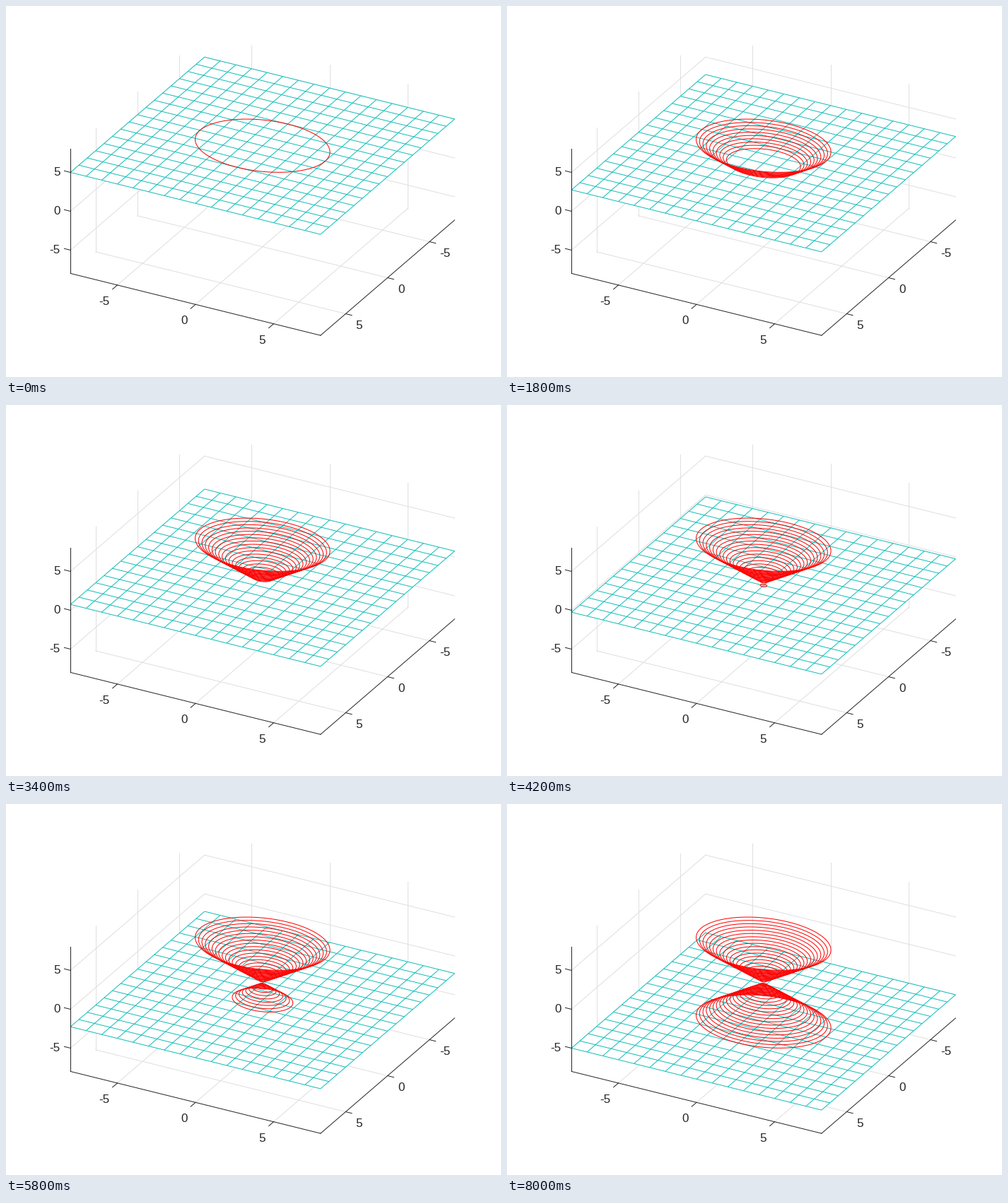
A matplotlib script for the animation above (8.2 s loop, 700 by 525 pixels).

```python
import numpy as np
import matplotlib.pyplot as plt
from matplotlib.animation import FuncAnimation
from matplotlib.collections import LineCollection
from matplotlib.patches import Polygon

W, H, DPI = 700, 525, 100
STEPS, INTERVAL = 41, 200
LIM = 8
TICKS = (-5, 0, 5)
PX = 72 / DPI

DARK, GRID, TEAL, RED = "#262626", "#dfdfdf", "#12beb9", "#ff0000"

ORIGIN = np.array([362.8, 252.7])
AX = np.array([22.1, 5.48])
AY = np.array([-11.85, 10.2])
AZ = np.array([0, -11.0])


def project(x, y, z):
    """Parallel projection of space to stage pixels."""
    x, y, z = np.broadcast_arrays(x, y, z)
    return ORIGIN + x[..., None] * AX + y[..., None] * AY + z[..., None] * AZ


def segment(p, q):
    return np.array([project(*p), project(*q)])


def ellipse(z):
    t = np.linspace(0, 2 * np.pi, 181)
    return project(0.8 * z * np.cos(t), 0.6 * z * np.sin(t), z)


def mesh(z):
    lines = []
    for v in range(-LIM, LIM + 1):
        lines.append(segment((v, -LIM, z), (v, LIM, z)))
        lines.append(segment((-LIM, v, z), (LIM, v, z)))
    return lines


fig = plt.figure(figsize=(W / DPI, H / DPI), dpi=DPI, facecolor="white")
ax = fig.add_axes([0, 0, 1, 1])
ax.set_xlim(0, W)
ax.set_ylim(H, 0)
ax.axis("off")


def stroke(points, color, order):
    ax.plot(*np.transpose(points), color=color, lw=PX, zorder=order)


def label(value, pos, ha):
    ax.text(*pos, str(value), ha=ha, va="baseline", color=DARK,
            family="Liberation Sans", fontsize=17 * PX, zorder=6)


def tick(base, direction):
    step = 9 * direction / np.hypot(*direction)
    stroke([base, base + step], DARK, 5)


# Walls, floor, ticks and labels
for v in TICKS:
    for p, q in (
        ((-LIM, v, -LIM), (-LIM, v, LIM)),
        ((v, -LIM, -LIM), (v, -LIM, LIM)),
        ((-LIM, -LIM, v), (-LIM, LIM, v)),
        ((-LIM, -LIM, v), (LIM, -LIM, v)),
        ((v, -LIM, -LIM), (v, LIM, -LIM)),
        ((-LIM, v, -LIM), (LIM, v, -LIM)),
    ):
        stroke(segment(p, q), GRID, 1)

    px = project(v, LIM, -LIM)
    py = project(LIM, v, -LIM)
    pz = project(-LIM, LIM, v)
    tick(px, AY)
    tick(py, AX)
    tick(pz, -AX)
    label(v, px + (-11.3, 28.2), "right")
    label(v, py + (14.4, 21.7), "left")
    label(v, pz + (-14.6, 4.4), "right")

# Axis lines
stroke(segment((-LIM, LIM, -LIM), (-LIM, LIM, LIM)), DARK, 5)
stroke(segment((-LIM, LIM, -LIM), (LIM, LIM, -LIM)), DARK, 5)
stroke(segment((LIM, LIM, -LIM), (LIM, -LIM, -LIM)), DARK, 5)

corners = np.array([-1, 1, 1, -1]) * LIM, np.array([-1, -1, 1, 1]) * LIM
sheet = Polygon(project(*corners, 5), facecolor="white", edgecolor="none", zorder=2)
wires = LineCollection([], colors=TEAL, linewidths=PX, zorder=3)
rings = LineCollection([], colors=RED, linewidths=PX, zorder=4)
ax.add_patch(sheet)
ax.add_collection(wires, autolim=False)
ax.add_collection(rings, autolim=False)

levels = np.linspace(5, -5, STEPS)


def update(i):
    z = levels[i]
    sheet.set_xy(project(*corners, z))
    wires.set_segments(mesh(z))
    rings.set_segments([ellipse(h) for h in levels[:i + 1]])
    return sheet, wires, rings


anim = FuncAnimation(fig, update, frames=STEPS, interval=INTERVAL,
                     repeat=True, repeat_delay=0)
plt.show()
```
